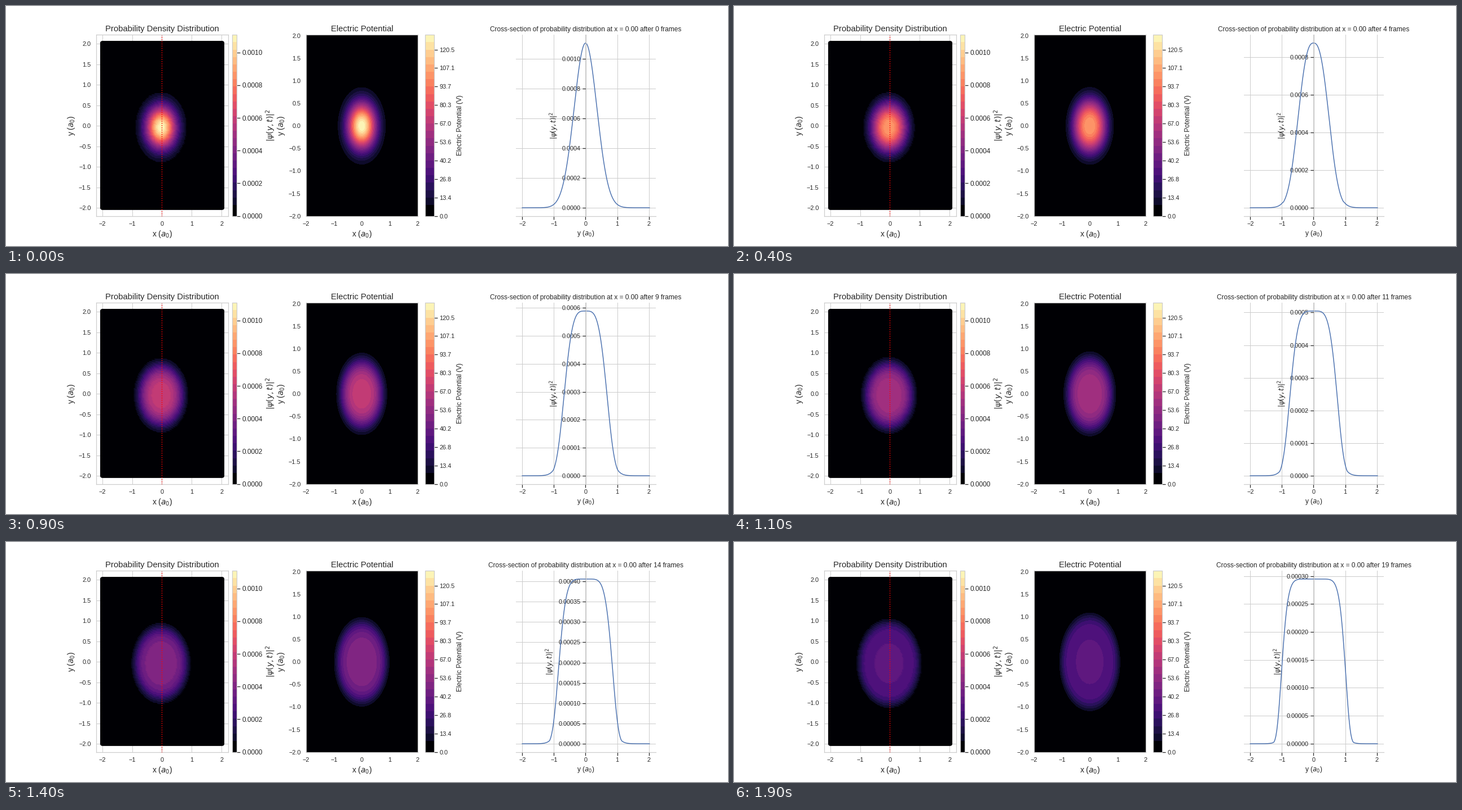
These frames come from a looping animation (1280 px wide and 427 px high, 2 s). A matplotlib script:

```python
import math

import matplotlib.pyplot as plt
import numpy as np
from matplotlib.animation import FuncAnimation
from matplotlib.cm import ScalarMappable
from matplotlib.colors import BoundaryNorm, ListedColormap

W, H, DPI = 1280, 427, 64
K = 10 / 9  # scales point sizes to the figure's resolution
FRAMES, INTERVAL = 20, 100

INK, GREY = "0.15", "0.8"
plt.rcParams.update({
    "font.family": "Liberation Sans",
    "text.color": INK,
    "axes.labelcolor": INK,
    "axes.edgecolor": GREY,
    "axes.linewidth": 1.25 * K,
    "axes.axisbelow": True,
    "axes.labelpad": 4 * K,
    "axes.labelsize": 12 * K,
    "axes.titlesize": 12 * K,
    "axes.titlepad": 6 * K,
    "grid.color": GREY,
    "grid.linewidth": 1 * K,
})
for side in ("xtick", "ytick"):
    plt.rcParams.update({
        f"{side}.color": INK,
        f"{side}.labelsize": 11 * K,
        f"{side}.major.size": 6 * K,
        f"{side}.major.width": 1.25 * K,
        f"{side}.major.pad": 3.5 * K,
    })

# Physics: a Gaussian packet that spreads into a flat-topped disc
PEAK = 0.001108
VOLTS = 131.227
DECAY = 3.868
SPREAD = np.polyfit([0, 4, 9, 11, 14, 16, 19],
                    [1, 1.264, 1.883, 2.198, 2.725, 3.125, 3.76], 4)

axis = -2 + 0.03 * np.arange(135)
gx, gy = np.meshgrid(axis, axis)
radius = np.hypot(gx, gy)


def peak_ratio(n):
    return 1 / np.polyval(SPREAD, n) if n else 1.0


def density(r, n):
    """Density relative to the initial peak, with constant total mass."""
    top = peak_ratio(n)
    power = 2 + 0.1 * n + 0.0115 * n * n
    width = math.sqrt(1 / (top * DECAY * math.gamma(1 + 2 / power)))
    disc = top * np.exp(-(r / width) ** power)
    tail = np.where(r > 0.95, np.exp(-DECAY * r * r), 0)
    return np.maximum(disc, tail)


# Stepped colour scale
edges = np.r_[0, np.arange(3, 50, 2)] / 49
mids = (edges[:-1] + edges[1:]) / 2
mids[0] = 0
magma = ListedColormap(plt.get_cmap("magma")(mids))


def scale(top):
    return BoundaryNorm(edges * top, magma.N)


fig = plt.figure(figsize=(W / DPI, H / DPI), dpi=DPI, facecolor="white")
BOTTOM, HEIGHT = 0.125, 0.755


def add_axes(left, width):
    return fig.add_axes([left / W, BOTTOM, width / W, HEIGHT])


def add_map(left, width, title, low, high):
    ax = add_axes(left, width)
    ax.set_title(title, fontsize=15 * K)
    ax.set_xlabel("x ($a_0$)", fontsize=14 * K)
    ax.set_ylabel("y ($a_0$)", fontsize=14 * K)
    ax.set(xlim=(low, high), ylim=(low, high),
           xticks=np.arange(-2, 3), yticks=np.arange(-2, 2.1, 0.5))
    ax.tick_params(length=0, pad=9.5 * K)
    ax.grid(True)
    return ax


def add_bar(left, width, top, ticks, fmt, label, label_size, tick_size):
    bar = fig.colorbar(ScalarMappable(scale(top), magma),
                       cax=add_axes(left, width), ticks=ticks,
                       format=fmt, spacing="proportional")
    bar.minorticks_off()
    bar.set_label(label, fontsize=label_size * K)
    bar.ax.tick_params(labelsize=tick_size * K)


PSI = r"$|\psi(y,t)|^2$"

prob_ax = add_map(160, 234, "Probability Density Distribution", -2.2, 2.22)
dots = prob_ax.scatter(gx.ravel(), gy.ravel(), s=(7.5 * K) ** 2, linewidths=0,
                       c=PEAK * density(radius, 0).ravel(),
                       cmap=magma, norm=scale(PEAK))
prob_ax.set(xlim=(-2.2, 2.22), ylim=(-2.2, 2.22))
prob_ax.axvline(0, color="red", ls=":", lw=1.5 * K)
add_bar(401, 8, PEAK, np.arange(6) * 0.0002, "%.4f", PSI, 14, 12)

volt_ax = add_map(532, 198.4, "Electric Potential", -2, 2.02)
volt_ax.set_facecolor(magma(0))
add_bar(742.8, 16.1, VOLTS, np.arange(0, 50, 5) / 49 * VOLTS, "%.1f",
        "Electric Potential (V)", 12, 11)

cut_ax = add_axes(904, 248)
cut_ax.grid(True)
cut_ax.set(xlim=(-2.2, 2.22), xticks=np.arange(-2, 3),
           xlabel="y ($a_0$)", ylabel=PSI)
cut_ax.spines["left"].set_position("center")
cut_ax.spines[["top", "right"]].set_visible(False)
curve, = cut_ax.plot([], [], color="#4C72B0", lw=1.5 * K)

contour = None


def start():
    return []


def update(n):
    global contour
    field = density(radius, n)
    dots.set_array(PEAK * field.ravel())

    if contour is not None:
        contour.remove()
    contour = volt_ax.contourf(gx, gy, VOLTS * field, levels=edges * VOLTS,
                               cmap=magma, norm=scale(VOLTS))

    curve.set_data(axis, PEAK * density(np.abs(axis), n))
    top = PEAK * peak_ratio(n)
    cut_ax.set_ylim(-0.05 * top, 1.05 * top)
    cut_ax.set_title("Cross-section of probability distribution "
                     f"at x = 0.00 after {n} frames")
    return []


anim = FuncAnimation(fig, update, frames=FRAMES, init_func=start,
                     interval=INTERVAL, repeat=True, repeat_delay=0)
plt.show()
```
